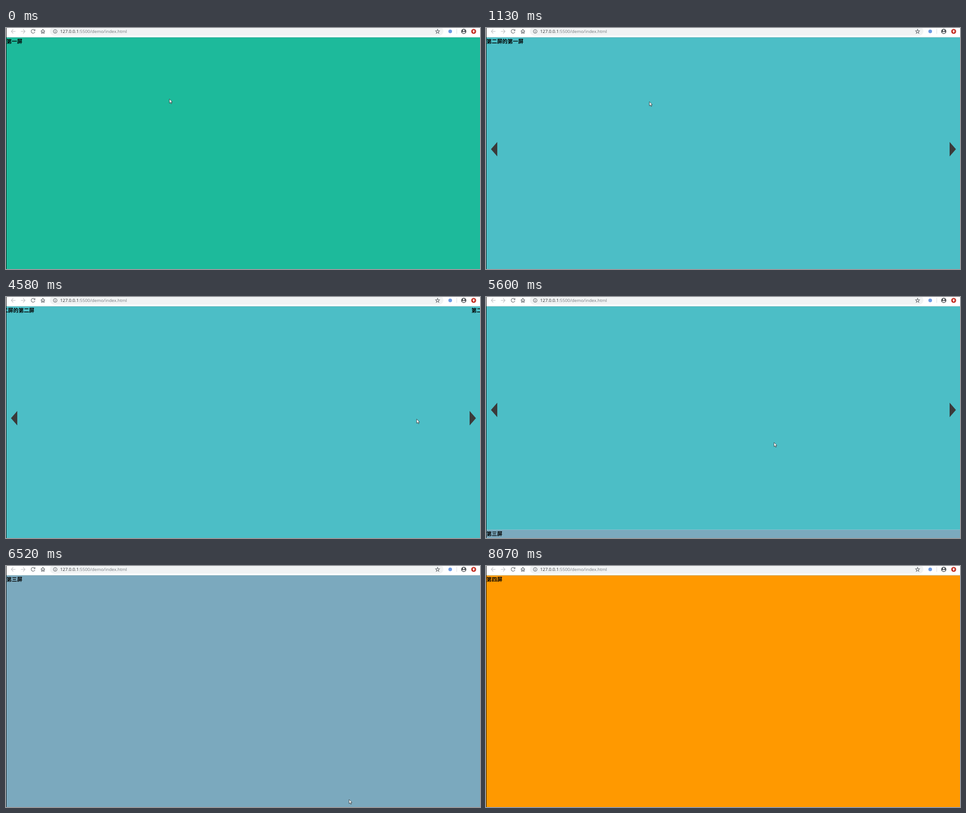
An HTML page for the animation above (8.63 s loop, 1050 by 534 pixels).

```html
<!DOCTYPE html>
<html lang="zh-CN">
<head>
<meta charset="utf-8">
<style>
  html, body { margin: 0; width: 100%; height: 100%; overflow: hidden; background: #fff; }
  svg { display: block; }
  .title { font: bold 11.7px "Noto Sans CJK SC", "Noto Sans CJK", sans-serif; }
  .url { font: 9.75px "Open Sans", "Noto Sans", sans-serif; }
  .icon { fill: none; stroke: #5f6368; stroke-width: 1.1; }
  .icon.off { stroke: #bcbec1; }
</style>
</head>
<body>
<svg width="1050" height="534" viewBox="0 0 1050 534">
  <clipPath id="view"><rect x="1" y="21" width="1049" height="513"/></clipPath>
  <g clip-path="url(#view)">
    <g id="page">
      <g id="sections"></g>
      <g id="slides"></g>
      <path d="M11 781.5l14 -16v32zM1041 781.5l-14 -16v32z" fill="#3b3a3a"/>
    </g>
  </g>

  <rect width="1050" height="20" fill="#fff"/>
  <rect y="20" width="1050" height="1" fill="#b9cfd0"/>
  <rect x="97" y="-3" width="872" height="20" rx="10" fill="#f1f3f4"/>
  <path class="icon off" d="M21 7.5h-9m4 -4.5l-4.3 4.5l4.3 4.5M33 7.5h9m-4 -4.5l4.3 4.5l-4.3 4.5"/>
  <path class="icon" d="M63.3 4.7a4.2 4.2 0 1 0 .7 3.9m.2 -5.8v3.2h-3.2"/>
  <path class="icon" d="M77.2 7.5l4.5 -4.2l4.5 4.2m-7.5 -.7v4.8h1.9v-3.1h2.2v3.1h1.9v-4.8"/>
  <circle class="icon" cx="109" cy="7.5" r="4"/>
  <path class="icon" d="M109 6.8v3.2m0 -5.2v1"/>
  <text class="url" x="120" y="11" fill="#2c2e31">127.0.0.1<tspan fill="#74797e">:5500/demo/index.html</tspan></text>
  <polygon id="star" class="icon"/>
  <circle cx="984" cy="7.5" r="4" fill="#6f9be3"/>
  <path d="M998.5 2v11" stroke="#dadce0"/>
  <circle cx="1014" cy="7.5" r="5.7" fill="#505357"/>
  <circle cx="1014" cy="5.4" r="1.8" fill="#fff"/>
  <ellipse cx="1014" cy="10" rx="3.4" ry="1.6" fill="#fff"/>
  <circle cx="1036" cy="7.5" r="5.5" fill="#c5362b"/>
  <path d="M1036 4.2l3 3.4h-2v2.7h-2v-2.7h-2z" fill="#fff"/>
  <rect width="1" height="534" fill="#000"/>

  <circle id="press" cx="1032.3" cy="267.5" r="8.3" fill="#e6d700" fill-opacity=".6"/>
  <g id="cursor" fill="#fff" stroke="#222" stroke-width=".8" stroke-linejoin="round">
    <path id="arrow" d="M0 .3v9.3l2.2 -2l1.5 3.3l1.5 -.7l-1.5 -3.2h2.8z"/>
    <path id="hand" d="M-1 1q1 -1.5 2 0v4q4 -.8 5.6 2.2v2.3l-1.3 3.8h-6l-3 -4.5q0 -1.6 1.5 -1l1.2 1.2z"/>
  </g>
</svg>
<script>
const LOOP = 8630, DURATION = 700, PRESS = 80;
const TOP = 21, HEIGHT = 513, WIDTH = 1050;
const scrollStarts = [430, 5564, 7368];
const slideStarts = [2230, 3300, 4379];
const pointerStart = { x: 362, y: 157 };
const pointerMoves = [
  { from: 280, to: 430, x: 362, y: 163 },
  { from: 1320, to: 2170, x: 1033, y: 267 },
  { from: 4370, to: 4900, x: 680, y: 276 },
  { from: 5170, to: 5600, x: 638, y: 322 },
  { from: 6060, to: 6520, x: 760, y: 517 },
  { from: 6770, to: 7250, x: 973, y: 482 },
  { from: 7600, to: 7960, x: 1060, y: 545 }
];

const el = id => document.getElementById(id);
const show = (id, on) => el(id).setAttribute('visibility', on ? 'visible' : 'hidden');
const place = (id, x, y) => el(id).setAttribute('transform', `translate(${x} ${y})`);
const clamp = k => Math.min(1, Math.max(0, k));
const smooth = k => k * k * (3 - 2 * k);
const title = (text, column, row) =>
  `<text class="title" x="${1 + column * WIDTH}" y="${TOP + 13 + row * HEIGHT}">${text}</text>`;

el('sections').innerHTML = ['#1dba9b', '#4cbec6', '#7ba9be', '#f90'].map((color, row) =>
  `<rect y="${TOP + row * HEIGHT}" width="${WIDTH}" height="${HEIGHT}" fill="${color}"/>` +
  (row === 1 ? '' : title(`第${'一二三四'[row]}屏`, 0, row))).join('');
el('slides').innerHTML = [...'一二三'].map((n, column) => title(`第二屏的第${n}屏`, column, 1)).join('');
el('star').setAttribute('points', Array.from({ length: 10 }, (_, i) => {
  const radius = i % 2 ? 2.1 : 4.8, angle = i * Math.PI / 5;
  return [956 + radius * Math.sin(angle), 7.8 - radius * Math.cos(angle)];
}).join(' '));

// CSS "ease": cubic-bezier(.25, .1, .25, 1)
function ease(x) {
  if (x === 0 || x === 1) return x;
  const curve = (a, b, s) => 3 * a * s * (1 - s) ** 2 + 3 * b * s * s * (1 - s) + s ** 3;
  let low = 0, high = 1;
  for (let i = 0; i < 24; i++) {
    const mid = (low + high) / 2;
    if (curve(.25, .25, mid) < x) low = mid; else high = mid;
  }
  return curve(.1, 1, low);
}

function pointerAt(t) {
  return pointerMoves.reduce((p, move) => {
    const k = smooth(clamp((t - move.from) / (move.to - move.from)));
    return { x: p.x + (move.x - p.x) * k, y: p.y + (move.y - p.y) * k };
  }, pointerStart);
}

function draw() {
  const t = performance.now() % LOOP;
  const progress = start => ease(clamp((t - start) / DURATION));
  const section = scrollStarts.reduce((sum, start) => sum + progress(start), 0);
  const [first, second, rewind] = slideStarts.map(progress);
  place('page', 0, -section * HEIGHT);
  place('slides', -(first + second - 2 * rewind) * WIDTH, 0);

  const { x, y } = pointerAt(t);
  const overArrow = Math.abs(x - 1034) < 7 && Math.abs(y - 269) < 16;
  place('cursor', x, y);
  show('hand', overArrow);
  show('arrow', !overArrow);
  show('press', slideStarts.some(start => t >= start - PRESS && t < start));
  requestAnimationFrame(draw);
}
draw();
</script>
</body>
</html>
```
